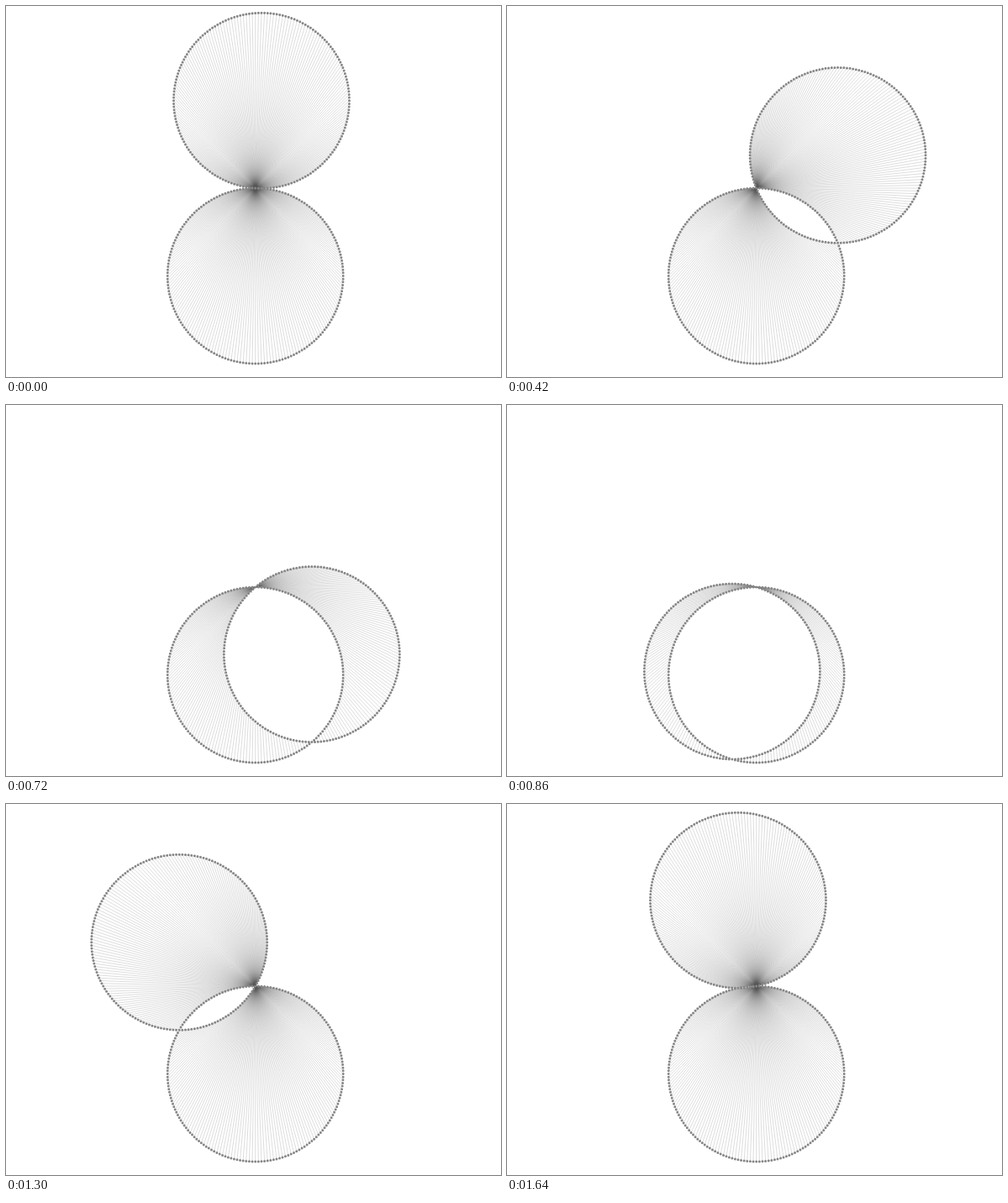
An HTML page with a canvas for the animation above (1.68 s loop, 589x442 px).

```html
<!DOCTYPE html>
<html lang="en">
<head>
<meta charset="utf-8">
<title>Rotating circles</title>
<style>
  html, body { margin: 0; width: 100%; height: 100%; overflow: hidden; background: #fff; }
  canvas { display: block; }
</style>
</head>
<body>
<canvas id="stage" width="589" height="442"></canvas>
<script>
const ctx = document.getElementById('stage').getContext('2d');
const pivot = { x: 296.7, y: 217 };
const R = 104.5, DOT = 1.5, COUNT = 180, LOOP = 1680;
const rad = deg => deg * Math.PI / 180;

// Step lengths as [count, ms]: slow at the top, fast at the bottom.
const runs = [[1, 40], [5, 60], [8, 40], [15, 20], [7, 40], [6, 60], [2, 40]];
const starts = [];
let end = 0;
for (const [count, ms] of runs) {
  for (let i = 0; i < count; i++, end += ms) starts.push(end);
}

function stepAt(time) {
  let step = starts.length - 1;
  while (starts[step] > time) step--;
  return step;
}

// Second point where a line through the pivot meets a circle
// whose centre lies in direction `turn` (clockwise from up).
function chordEnd(line, turn) {
  const length = 2 * R * Math.cos(line - turn);
  return {
    x: pivot.x + length * Math.sin(line),
    y: pivot.y - length * Math.cos(line)
  };
}

function addDot(p) {
  ctx.moveTo(p.x + DOT, p.y);
  ctx.arc(p.x, p.y, DOT, 0, 2 * Math.PI);
}

function draw(step) {
  const turn = rad(4 + 8 * step);
  const pairs = Array.from({ length: COUNT }, (_, i) => {
    const line = rad(i * 180 / COUNT);
    return [chordEnd(line, Math.PI), chordEnd(line, turn)];
  });

  ctx.fillStyle = '#fff';
  ctx.fillRect(0, 0, 589, 442);

  ctx.strokeStyle = 'rgba(84, 84, 84, 0.25)';
  ctx.lineWidth = 0.8;
  for (const [a, b] of pairs) {
    ctx.beginPath();
    ctx.moveTo(a.x, a.y);
    ctx.lineTo(b.x, b.y);
    ctx.stroke();
  }

  ctx.fillStyle = '#868686';
  ctx.beginPath();
  pairs.flat().forEach(addDot);
  ctx.fill();
}

let shown = -1;
function tick() {
  const step = stepAt(performance.now() % LOOP);
  if (step !== shown) draw(shown = step);
  requestAnimationFrame(tick);
}
tick();
</script>
</body>
</html>
```
